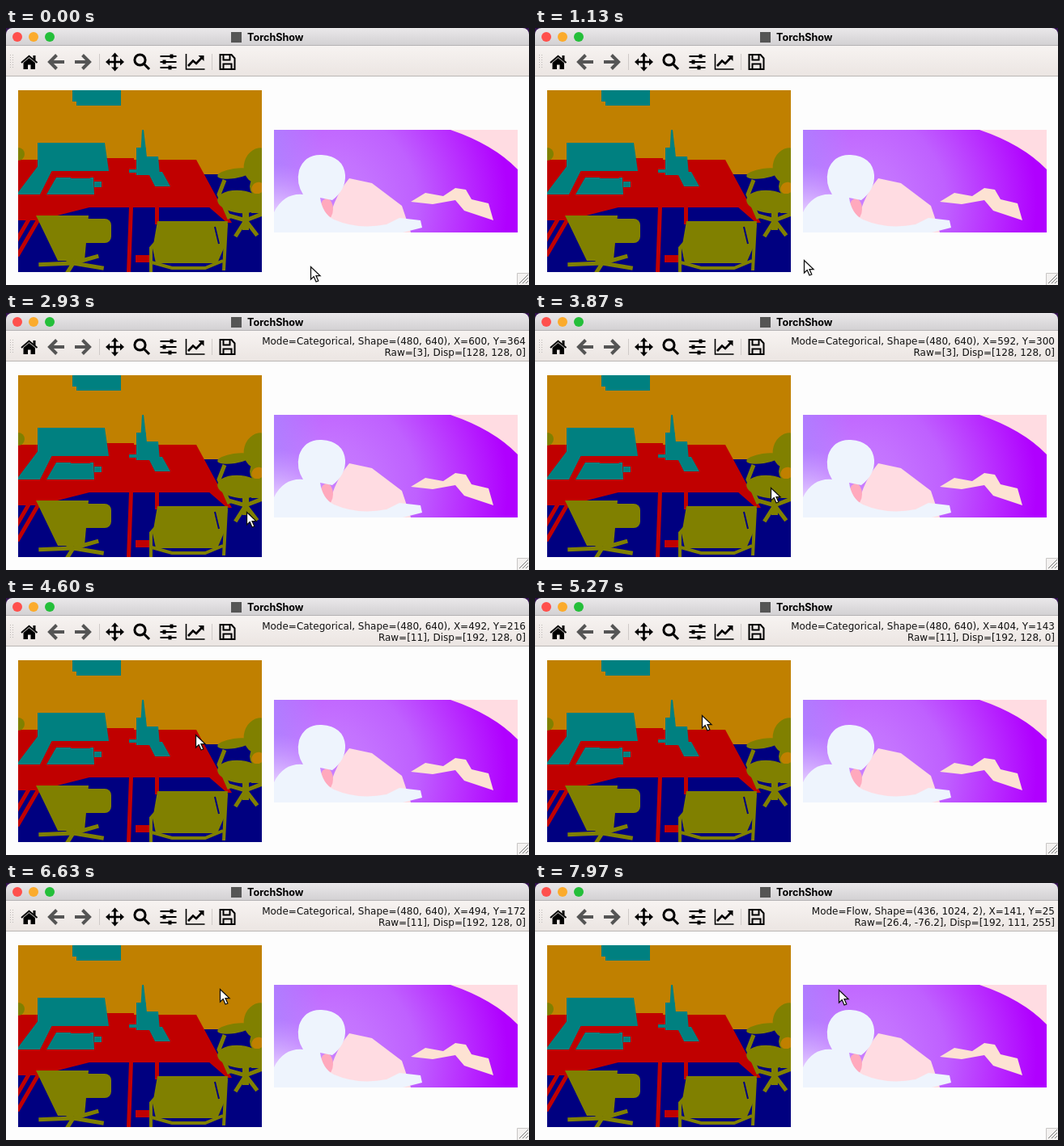
Recreate the animation shown at these times as an HTML page with a canvas. Size 646x318 px, loop 8 s.

```html
<!DOCTYPE html>
<html lang="en">
<head>
<meta charset="utf-8">
<title>TorchShow</title>
<style>
  html, body { margin: 0; width: 100%; height: 100%; overflow: hidden; background: #fdfdfd; }
  canvas { display: block; }
</style>
</head>
<body>
<canvas id="stage" width="646" height="318"></canvas>
<script>
const W = 646, H = 318, LOOP = 8000, LAG = 130;
const view = document.getElementById('stage').getContext('2d');
const backdrop = document.createElement('canvas');
backdrop.width = W;
backdrop.height = H;
const g = backdrop.getContext('2d', { willReadFrequently: true });

const SEG = { x: 15, y: 77, w: 301, h: 225, cols: 640, rows: 480 };
const FLOW = { x: 331, y: 126, w: 301, h: 127, cols: 1024, rows: 436 };

// The bits of a class number are spread over red, green and blue.
const classColor = id => [0, 1, 2].map(c => (id >> c & 1) * 128 + (id >> c + 3 & 1) * 64);
const CHAIR = 3, FLOOR = 4, OBJECT = 6, TABLE = 9, WALL = 11;
const CLASSES = [CHAIR, FLOOR, OBJECT, TABLE, WALL];
const [OLIVE, NAVY, TEAL, RED, ORANGE] = CLASSES.map(id => `rgb(${classColor(id)})`);

// Resting points of the pointer: time, x, y
const STOPS = [
  [0, 376, 295], [1130, 332, 287], [2800, 297.4, 247.9], [3740, 293.6, 217.9],
  [5140, 205.2, 144.3], [6500, 247.6, 157.9], [6630, 264, 131], [7250, 350, 97],
  [7840, 372.6, 133.4], [LOOP, 375.4, 131.8]
];

function rect(color, x, y, w, h) {
  g.fillStyle = color;
  g.fillRect(x, y, w, h);
}

function fill(color, d) {
  g.fillStyle = color;
  g.fill(new Path2D(d));
}

function line(color, width, d) {
  g.strokeStyle = color;
  g.lineWidth = width;
  g.stroke(new Path2D(d));
}

function ellipse(color, x, y, rx, ry = rx, tilt = 0) {
  g.fillStyle = color;
  g.beginPath();
  g.ellipse(x, y, rx, ry, tilt, 0, 2 * Math.PI);
  g.fill();
}

// Trapezoid between two level edges
function slab(color, top, left, right, bottom, left2, right2) {
  fill(color, `M${left} ${top}H${right}L${right2} ${bottom}H${left2}Z`);
}

function blend(paint, ...colors) {
  colors.forEach((color, i) => paint.addColorStop(i / (colors.length - 1), color));
  return paint;
}

function placed(x, y, turn, draw) {
  g.save();
  g.translate(x, y);
  g.rotate(turn);
  draw();
  g.restore();
}

function inside({ x, y, w, h }, draw) {
  g.save();
  g.beginPath();
  g.rect(x, y, w, h);
  g.clip();
  draw();
  g.restore();
}

function drawTitleBar() {
  rect('#32124f', 0, 0, W, 12);
  g.fillStyle = blend(g.createLinearGradient(0, 0, 0, 22), '#eae8ea', '#d2d0d2');
  g.beginPath();
  g.roundRect(0, 0, W, 22, [8, 8, 0, 0]);
  g.fill();
  rect('#b4b2b4', 0, 21, W, 1);
  ['#ff504c', '#fbab2c', '#24bf3a'].forEach((color, i) => ellipse(color, 14 + 20 * i, 11, 6));
  rect('#555', 278, 5, 13, 13);
  g.fillStyle = '#000';
  g.font = 'bold 12.6px Inter, sans-serif';
  g.fillText('TorchShow', 298, 16);
}

function drawIcons() {
  // Home
  fill('#000', 'M22 43L29 37 36.5 43V51H31V45.5H27.5V51H22Z');
  line('#000', 2, 'M19.5 43L29 34.8 39 43');
  rect('#000', 34, 34, 3, 6);
  // Back and forward
  for (const [x, turn] of [[63, 0], [95, Math.PI]])
    placed(x, 42, turn, () => line('#555', 4, 'M0 -8.5L-8.5 0 0 8.5M-8 0H9.5'));
  // Pan
  for (let i = 0; i < 4; i++)
    placed(135, 42, i * Math.PI / 2, () => {
      line('#000', 2.6, 'M0 0H8');
      fill('#000', 'M11.5 0L6.5 -4.5V4.5Z');
    });
  // Zoom
  line('#000', 3, 'M172.6 39.5A6.6 6.6 0 1 1 159.4 39.5A6.6 6.6 0 1 1 172.6 39.5M171 44.5L177.5 51');
  // Sliders
  [203, 194, 201].forEach((x, i) => {
    rect('#000', 191, 34 + 7 * i, 20, 2);
    rect('#000', x, 32.5 + 7 * i, 4, 5);
  });
  // Axes
  line('#000', 1.6, 'M223 32V51H246');
  line('#000', 2.6, 'M225.5 47L231.5 40.5 235.5 44 243 36');
  fill('#000', 'M238 34H245V41Z');
  // Save
  line('#000', 2, 'M265 33H279L283 37.5V51H265ZM269 51V44.5H279V51M269 33V39.5H277V33');
}

function drawToolbar() {
  rect(blend(g.createLinearGradient(0, 22, 0, 60), '#f7f3f1', '#ebe5e2'), 0, 22, W, 38);
  rect('#bab6b4', 0, 59, W, 1);
  for (let y = 33; y < 51; y += 3)
    for (const x of [5, 8]) rect('#bcb8b6', x, y, 1, 1);
  for (const x of [115, 254]) rect('#cfcac8', x, 32, 1, 20);
  placed(-.5, 0, 0, drawIcons);
}

// Flattened star of chair legs
function legs(x, y, rx, ry, turn) {
  for (let i = 0; i < 5; i++) {
    const a = turn + i * 2 * Math.PI / 5;
    line(OLIVE, 5, `M${x} ${y}L${x + rx * Math.cos(a)} ${y + ry * Math.sin(a)}`);
  }
}

function drawTable() {
  slab(RED, 163, 15, 235, 222, 15, 267);
  slab(RED, 221, 250, 267, 241, 273, 279);
  slab(RED, 222, 15, 103, 238, 15, 40);
  rect(RED, 122, 161, 36, 3);
  slab(RED, 221, 152, 157, 302, 149, 154);
  rect(RED, 184, 221, 5, 22);
  rect(RED, 160, 281, 18, 9);
  for (const x of [28, 40]) line(RED, 5, `M${x} 237L${x - 26} 282`);
}

function drawObjects() {
  rect(TEAL, 82, 77, 60, 14);
  rect(TEAL, 87, 90, 55, 6);
  slab(TEAL, 142, 39, 122, 177, 39, 127);
  slab(TEAL, 170, 40, 60, 206, 13, 42);
  slab(TEAL, 185, 62, 108, 206, 50, 109);
  rect(TEAL, 109, 190, 9, 7);
  rect(RED, 80, 181, 24, 5);
  slab(TEAL, 126, 168, 170, 160, 166, 174);
  rect(TEAL, 161, 148, 12, 12);
  slab(TEAL, 159, 161, 188, 182, 161, 190);
  slab(TEAL, 178, 175, 193, 196, 184, 203);
  rect(TEAL, 152, 175, 12, 4);
}

function drawWallChair() {
  ellipse(OLIVE, 15, 156, 8, 8);
  ellipse(OLIVE, 312, 170, 18, 22, .3);
  ellipse(OLIVE, 282, 180, 21, 6, -.15);
  ellipse(OLIVE, 311, 196, 10, 12);
  ellipse(ORANGE, 311, 198, 8, 7, -.6);
  ellipse(OLIVE, 289, 215, 28, 14, .1);
  rect(OLIVE, 303, 205, 13, 24);
  line(OLIVE, 5, 'M270 188L263 206 276 236');
  line(OLIVE, 8, 'M296 226V250');
  legs(296, 238, 23, 24, .9);
}

function drawFrontChairs() {
  slab(OLIVE, 232, 37, 102, 288, 64, 97);
  g.fillStyle = OLIVE;
  g.beginPath();
  g.roundRect(90, 236, 40, 30, 8);
  g.fill();
  legs(83, 291, 43, 13, .5);

  slab(OLIVE, 239, 187, 274, 268, 182, 271);
  slab(OLIVE, 268, 180, 271, 291, 185, 261);
  line(OLIVE, 4, 'M186 264L179 272V302M272 242L269 300M180 290L205 297H246L268 288');
  line(NAVY, 2, 'M258 246L263 267');
}

function drawSegmentation() {
  const { x, y, w, h } = SEG;
  rect(ORANGE, x, y, w, h);
  rect(NAVY, x, 181, w, h);
  drawTable();
  drawObjects();
  drawWallChair();
  drawFrontChairs();
}

function drawFlow() {
  const { x, y, w, h } = FLOW;
  const right = x + w, bottom = y + h;
  rect(blend(g.createRadialGradient(395, 215, 0, 395, 215, 225),
    '#c97eff', '#c473ff', '#bf60ff', '#b930ff', '#b000ff'), x, y, w, h);
  rect(blend(g.createLinearGradient(x, 0, x + 60, 0), '#a78cffa0', '#a78cff00'), x, y, w, h);
  rect(blend(g.createRadialGradient(x, bottom, 5, x, bottom, 85), '#fff8ff', '#ddb0ff00'), x, y, w, h);

  fill('#ffdce2', `M549 ${y}Q602 144 ${right} 175V${y}Z`);
  fill('#ffdce2', 'M396 253Q402 212 424 186L452 192 489 220 500 253Z');
  ellipse('#ffa9bd', 396, 224, 8, 13);
  // Figure with an outstretched arm
  fill('#eef4fd', 'M331 253V228Q343 204 367 206 358 192 362 176 369 156 390 157 417 159 419 182 420 200 403 213L388 210Q391 230 405 237 435 250 470 243L486 235 512 238 514 247 490 253Z');
  fill('#fde2d3', 'M500 215L518 204 540 208 555 198 568 200 575 212 596 217 602 238 566 226 555 213 527 218Z');
}

function drawGrip() {
  rect('#f4f2f1', 631, 303, 15, 15);
  line('#c8c6c5', 1, 'M631.5 318V303.5H646');
  for (let x = 634; x < 646; x += 4) line('#777', 1, `M${x} 316L645 ${x - 329}`);
}

function pointerAt(t) {
  const i = Math.max(1, STOPS.findIndex(stop => stop[0] >= t));
  const [t0, x0, y0] = STOPS[i - 1], [t1, x1, y1] = STOPS[i];
  const k = (t - t0) / (t1 - t0), eased = k * k * (3 - 2 * k);
  return [x0 + (x1 - x0) * eased, y0 + (y1 - y0) * eased];
}

function cellAt(box, x, y) {
  const col = Math.floor((x - box.x) / box.w * box.cols);
  const row = Math.floor((y - box.y) / box.h * box.rows);
  return col >= 0 && row >= 0 && col < box.cols && row < box.rows ? [col, row] : null;
}

function classAt(x, y) {
  const pixel = g.getImageData(Math.floor(x), Math.floor(y), 1, 1).data;
  const distance = id => Math.hypot(...classColor(id).map((v, c) => v - pixel[c]));
  return CLASSES.reduce((best, id) => distance(id) < distance(best) ? id : best);
}

function statusLines(x, y) {
  let cell = cellAt(SEG, x, y);
  if (cell) {
    const id = classAt(x, y);
    return [`Mode=Categorical, Shape=(480, 640), X=${cell[0]}, Y=${cell[1]}`,
            `Raw=[${id}], Disp=[${classColor(id).join(', ')}]`];
  }
  cell = cellAt(FLOW, x, y);
  if (!cell) return [];
  const [col, row] = cell, dx = col - 141, dy = row - 25;
  const u = (26.4 + dx * .03 - dy * .02).toFixed(1);
  const v = (-76.2 - dx * .08 + dy * .05).toFixed(1);
  return [`Mode=Flow, Shape=(436, 1024, 2), X=${col}, Y=${row}`,
          `Raw=[${u}, ${v}], Disp=[192, ${Math.round(111 - dx * .1 + dy * .1)}, 255]`];
}

const ARROW = new Path2D('M.5 .5V16L4.2 12.6 7 19 9.8 17.8 7 11.6H12Z');

function drawFrame(t) {
  view.drawImage(backdrop, 0, 0);

  view.font = '12px "DejaVu Sans", sans-serif';
  view.textAlign = 'right';
  view.fillStyle = '#111';
  statusLines(...pointerAt(Math.max(0, t - LAG)))
    .forEach((text, i) => view.fillText(text, 642, 39 + 14 * i));

  view.save();
  view.translate(...pointerAt(t).map(Math.round));
  view.fillStyle = '#fff';
  view.strokeStyle = '#111';
  view.lineWidth = 1.3;
  view.fill(ARROW);
  view.stroke(ARROW);
  view.restore();
}

rect('#fdfdfd', 0, 0, W, H);
drawTitleBar();
drawToolbar();
inside(SEG, drawSegmentation);
inside(FLOW, drawFlow);
drawGrip();

const start = performance.now();
function tick() {
  drawFrame((performance.now() - start) % LOOP);
  requestAnimationFrame(tick);
}
tick();
</script>
</body>
</html>
```
